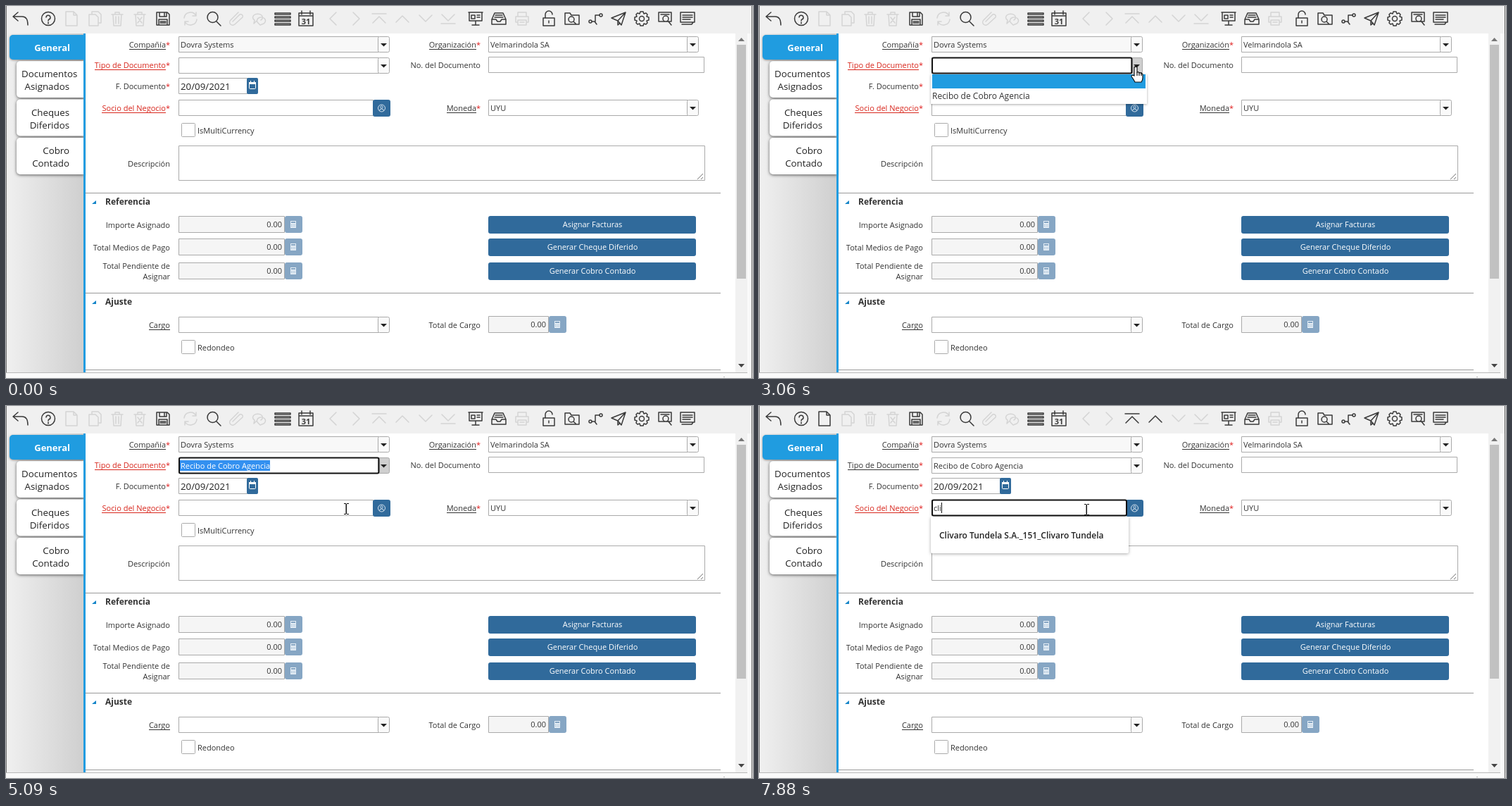
Recreate the animation shown at these times as an HTML page with a canvas. Size 1061x528 px, loop 8 s.

```html
<!DOCTYPE html>
<html lang="es">
<head>
<meta charset="utf-8">
<style>
html, body { margin: 0; width: 100%; height: 100%; overflow: hidden; background: #fff; }
canvas { display: block; }
</style>
</head>
<body>
<canvas id="stage" width="1061" height="528"></canvas>
<script>
const g = document.getElementById('stage').getContext('2d');
const LOOP = 8000;
const BLUE = '#209ce0', STEEL = '#306a9b', PALE = '#86a6c4', EDGE = '#aaa', DARK = '#3a3a3a', DIM = '#d4d4d4';
const CLIENT = 'Clivaro Tundela S.A._151_Clivaro Tundela';

// Cursor stops: time, x, y, length of one step on the way to the next stop
const stops = [
  [590, 1042, 514, 80], [990, 495, 156, 80],
  [1250, 495, 156, 70], [1530, 534, 82, 70], [1600, 535, 86, 70],
  [3320, 535, 86, 70], [3880, 489, 127, 70],
  [4743, 489, 127, 67], [5079, 483, 146, 67], [5213, 474, 151, 67], [5480, 465, 147, 67]
];
const clicks = [[2430, 2560, 536, 90], [4150, 4350, 489, 129], [5760, 5890, 465, 147]];

// Toolbar icons, drawn around their own centre: x, path, disabled
const icons = [
  [21, 'M-4-9L-11-3L-4 3M-11-3H2Q10-3 10 9'],
  [60, 'M-9.500 0a9.500 9.500 0 1 0 19 0a9.500 9.500 0 1 0-19 0M-3-2a3 3 0 1 1 4 3q-1 .5-1 2M0 5v2'],
  [93, 'M-8-10H3L8-5V10H-8ZM3-10V-5H8', 1],
  [126, 'M-8-6H1L5-2V10H-8ZM-4-6V-10H5L9-6V6H5', 1],
  [158, 'M-8-6H8M-3-6V-9H3V-6M-6-6L-5 10H5L6-6M-2-3V7M2-3V7', 1],
  [190, 'M-8-6H8M-3-6V-9H3V-6M-6-6L-5 10H5L6-6M-3-2L3 6M3-2L-3 6', 1],
  [223, 'M-9-9H6L9-6V9H-9ZM-5-9V-3H5V-9M2-8V-4M-6 9V1H6V9M-4 4H4M-4 6H4'],
  [262, 'M-9-1A9 9 0 0 1 8-4M8-9V-4H3M9 1A9 9 0 0 1-8 4M-8 9V4H-3', 1],
  [295, 'M-9-2a7.500 7.500 0 1 0 15 0a7.500 7.500 0 1 0-15 0M4 4L10 10'],
  [328, 'M-6 4L4-6a3 3 0 0 1 4 4L-3 8a4 4 0 0 1-6-6L2-9', 1],
  [361, 'M-5 3L-9 7L-8 2A7 5 0 1 1 1 2M-4 5A6 5 0 1 1 5 7L0 9Z', 1],
  [393, 'M-11-8H11V-6H-11ZM-11-3H11V-1H-11ZM-11 2H11V4H-11ZM-11 7H11V9H-11Z'],
  [426, 'M-10-8H10V10H-10ZM-10-4H10M-6-11V-6M6-11V-6'],
  [465, 'M4-9L-5 0L4 9', 1],
  [497, 'M-4-9L5 0L-4 9', 1],
  [530, 'M-10-7H10M-9 6L0-3L9 6', 1],
  [563, 'M-9 5L0-4L9 5', 1],
  [596, 'M-9-5L0 4L9-5', 1],
  [628, 'M-9-6L0 3L9-6M-10 7H10', 1],
  [667, 'M-10-9H10M-9-9V3H9V-9M0 3V9M-5 9H5M-6-5H-1V0H-6ZM2-5H6M2-2H6'],
  [700, 'M-10 1L-6-8H6L10 1V8H-10ZM-10 1H-4L-2 4H2L4 1H10M-5-5H5M-6-2H6'],
  [733, 'M-6-3V-9H6V-3M-6 5H-9V-3H9V5H6M-6 2H6V9H-6ZM-3 5H3', 1],
  [771, 'M-8-1H8V10H-8ZM-5-1V-6A5 5 0 0 1 5-6M0 3V6'],
  [804, 'M-10 8V-8H-3L-1-5H10V8ZM-5 1a4 4 0 1 0 8 0a4 4 0 1 0-8 0M2 4L6 8'],
  [837, 'M-9 4a2 2 0 1 0 4 0a2 2 0 1 0-4 0M-5 4H0V-5H6M6-5a2 2 0 1 0 4 0a2 2 0 1 0-4 0M-1 4L2 8'],
  [870, 'M-10-1L10-9L4 9L-1 3ZM10-9L-1 3V9L2 6'],
  [903, 'M-3.500 0a3.500 3.500 0 1 0 7 0a3.500 3.500 0 1 0-7 0M-2-10H2L3-7L6-8L8-6L7-3L10-2V2L7 3L8 6L6 8L3 7L2 10H-2L-3 7L-6 8L-8 6L-7 3L-10 2V-2L-7-3L-8-6L-6-8L-3-7Z'],
  [936, 'M-9-9H9V4H-9ZM-6-6H6M-3 0a4 4 0 1 0 8 0a4 4 0 1 0-8 0M4 3L9 9'],
  [968, 'M-10-9H10V5H-10ZM-7-5H7M-7-2H7M-7 1H4M-8 8H6L8 5']
].map(([x, d, off]) => ({ x, path: new Path2D(d), off }));

const ARROW = new Path2D('M0 0V16L4 12.500L6.500 18L9 17L6.500 11.500H11.500Z');
const HAND = new Path2D('M-2 1Q0-1 2 1V8Q4 7 5 9Q7 8 8 10Q10 9 10 12V16Q10 19 8 22H-1Q-3 18-6 14Q-6 11-2 13Z');

function box(x, y, w, h, fill, stroke, r = 0, line = 1) {
  g.beginPath();
  g.roundRect(x + (stroke ? .5 : 0), y + (stroke ? .5 : 0), w, h, r);
  if (fill) { g.fillStyle = fill; g.fill(); }
  if (stroke) { g.strokeStyle = stroke; g.lineWidth = line; g.stroke(); }
}
function text(s, x, y, color = '#333', align = 'left', size = 11, weight = 400) {
  g.font = `${weight} ${size}px "Open Sans", sans-serif`;
  g.textAlign = align;
  g.fillStyle = color;
  g.fillText(s, x, y);
}
function shadow(color, blur, draw) {
  g.save();
  g.shadowColor = color; g.shadowBlur = blur; g.shadowOffsetY = 1;
  draw();
  g.restore();
}
function label(s, right, y, { star, link, red } = {}) {
  const color = red ? '#d8261c' : '#333';
  if (star) { text('*', right, y, '#e02020', 'right'); right -= 6; }
  text(s, right, y, color, 'right');
  if (link) {
    const w = g.measureText(s).width;
    g.fillRect(Math.round(right - w), y + 2, Math.round(w), 1);
  }
}
function triangle(x1, y1, x2, y2, x3, y3, color) {
  g.fillStyle = color;
  g.beginPath(); g.moveTo(x1, y1); g.lineTo(x2, y2); g.lineTo(x3, y3); g.fill();
}
function combo(x, y, w, value, { focus, pressed, fill = '#fff' } = {}) {
  box(x, y, w - 16, 22, fill, EDGE);
  box(x + w - 17, y, 16, 22, pressed ? '#cfcfcf' : '#fafafa', EDGE, 2);
  triangle(x + w - 13, y + 10, x + w - 4, y + 10, x + w - 8.5, y + 14.5, '#222');
  if (focus) box(x + .5, y, w - 16.5, 22, null, '#111', 2, 2);
  text(value, x + 3, y + 16);
}
function amount(x, y, w) {
  box(x, y, w, 23, '#f5f5f5', EDGE);
  text('0.00', x + w - 3, y + 16, '#333', 'right');
  box(x + w + 1, y, 25, 24, PALE, null, 3);
  box(x + w + 9, y + 7, 8, 10, '#e4edf5');
  g.fillStyle = PALE;
  g.fillRect(x + w + 10, y + 8, 6, 2);
  for (let i = 0; i < 6; i++) g.fillRect(x + w + 10 + i % 3 * 2.3, y + 12 + (i / 3 | 0) * 2, 1, 1);
}
function button(y, s) {
  box(685, y, 295, 25, STEEL, null, 3);
  text(s, 833, y + 16, '#fff', 'center');
}
function section(y, s) {
  g.fillStyle = '#999';
  g.fillRect(113, y, 902, 1);
  triangle(128, y + 11, 128, y + 16, 122, y + 16, '#1585c8');
  text(s, 141, y + 17, '#333', 'left', 12, 700);
}
function check(y, s) {
  box(249, y, 19, 19, '#fff', EDGE, 1);
  text(s, 272, y + 15);
}

function toolbar(saved) {
  g.lineJoin = g.lineCap = 'round';
  for (const { x, path, off } of icons) {
    const on = !off || saved && [93, 530, 563].includes(x);
    g.save();
    g.translate(x, 18);
    g.strokeStyle = on ? DARK : DIM;
    g.lineWidth = 1.5;
    g.stroke(path);
    g.restore();
  }
  text('31', 426, 26, DARK, 'center', 11, 700);
  g.lineJoin = 'miter'; g.lineCap = 'butt';
}

function frame() {
  g.fillStyle = '#f0f0f0'; g.fillRect(0, 0, 1061, 528);
  const side = g.createLinearGradient(0, 0, 110, 0);
  side.addColorStop(0, '#f0f0f0'); side.addColorStop(1, '#cfcfcf');
  g.fillStyle = side; g.fillRect(0, 39, 110, 481);
  box(113, 39, 923, 481, '#fff');
  box(1036, 39, 17, 481, '#f1f1f1');
  box(1038, 55, 13, 332, '#c1c1c1');
  triangle(1040, 50, 1049, 50, 1044.5, 45, '#777');
  triangle(1040, 508, 1049, 508, 1044.5, 513, '#444');
  box(0, 521, 1061, 7, '#fafafa');
  box(0, 520, 1053, 1, '#b8b8b8');
  box(1053, 39, 6, 489, '#fafafa');
  box(0, 0, 1, 520, '#777');
  box(1059, 0, 1, 528, '#555');
  box(1019, 526, 2, 1, '#bbb');

  [['Documentos', 'Asignados'], ['Cheques', 'Diferidos'], ['Cobro', 'Contado']].forEach(([a, b], i) => {
    const y = 78 + i * 54.5;
    shadow('#0009', 4, () => box(15, y, 96, 52, '#fff', null, [5, 0, 0, 5]));
    if (i) text(a, 90, y + 23, '#222', 'right', 13.3);
    else text(a, 22, y + 23, '#222', 'left', 13.3);
    text(b, 90, y + 41, '#222', 'right', 13.3);
  });
  shadow('#0006', 3, () => box(5, 41, 106, 35, BLUE, null, [5, 0, 0, 5]));
  text('General', 91, 64, '#fff', 'right', 13, 700);
  box(110, 39, 3, 481, BLUE);
}

function form(t, hover) {
  const combofocus = t >= 2920 && t < 5760, chosen = t >= 4280, saved = t >= 5410, searching = t >= 5760;

  label('Compañía', 233, 59, { star: 1, link: 1 });
  combo(245, 43, 300, 'Dovra Systems', { fill: '#f8f8f8' });
  label('Organización', 674, 59, { star: 1, link: 1 });
  combo(685, 43, 299, 'Velmarindola SA');

  label('Tipo de Documento', 233, 88, { star: 1, link: 1, red: !saved });
  const picked = 'Recibo de Cobro Agencia';
  combo(245, 73, 300, chosen ? picked : '', { focus: combofocus, pressed: combofocus || hover });
  if (chosen && combofocus) {
    box(247, 77, 128, 15, '#3390f0');
    text(picked, 248, 89, '#fff');
  }
  label('No. del Documento', 674, 88);
  box(685, 72, 306, 22, '#fff', EDGE);

  label('F. Documento', 233, 118, { star: 1 });
  box(245, 102, 97, 22, '#fff', EDGE);
  text('20/09/2021', 248, 119, '#222', 'left', 13.3);
  box(342, 102, 16, 23, STEEL, null, 2);
  box(345, 108, 9, 9, null, '#fff', 1);
  box(345, 108, 10, 3, '#fff');
  box(347, 106, 1, 3, '#fff'); box(352, 106, 1, 3, '#fff');

  label('Socio del Negocio', 233, 149, { star: 1, link: 1, red: 1 });
  box(245, 133, 276, 22, '#fff', EDGE);
  box(521, 133, 25, 24, STEEL, null, 3);
  g.strokeStyle = '#d5e3ef'; g.lineWidth = 1;
  g.beginPath(); g.arc(533.5, 145, 5, 0, 7); g.stroke();
  g.beginPath(); g.arc(533.5, 143.5, 1.7, 0, 7); g.stroke();
  g.beginPath(); g.arc(533.5, 149, 3, Math.PI, 0); g.stroke();
  label('Moneda', 674, 149, { star: 1, link: 1 });
  combo(685, 133, 299, 'UYU');

  check(166, 'IsMultiCurrency');
  label('Descripción', 233, 228);
  box(245, 198, 747, 49, '#fff', EDGE);
  g.strokeStyle = '#777'; g.lineWidth = 1;
  g.beginPath();
  g.moveTo(982, 246); g.lineTo(990, 238); g.moveTo(987, 246); g.lineTo(990, 243);
  g.stroke();

  section(265, 'Referencia');
  label('Importe Asignado', 233, 315);
  label('Total Medios de Pago', 233, 347);
  label('Total Pendiente de', 233, 373);
  label('Asignar', 233, 388);
  amount(245, 298, 150); amount(245, 330, 150); amount(245, 364, 150);
  button(298, 'Asignar Facturas');
  button(330, 'Generar Cheque Diferido');
  button(364, 'Generar Cobro Contado');

  section(407, 'Ajuste');
  label('Cargo', 233, 457, { link: 1 });
  combo(245, 441, 300, '');
  label('Total de Cargo', 674, 457);
  amount(685, 440, 85);
  check(474, 'Redondeo');
  box(113, 516, 902, 1, '#999');

  if (searching) {
    box(245.5, 133, 276, 22, null, '#111', 2, 2);
    const typed = 'cli'.slice(0, t < 7480 ? 0 : t < 7680 ? 1 : t < 7880 ? 2 : 3);
    text(typed, 248, 149);
    const caretOn = t < 6350 || t >= 6880 && t < 7410 || t >= 7480;
    if (caretOn) box(248 + Math.round(g.measureText(typed).width), 137, 1, 15, '#111');
  }
  if (t >= 5890) {
    shadow('#0005', 4, () => box(244, 157, 281, 52, '#fff', null, 2));
    text(CLIENT, 256, 188, '#222', 'left', 12, 600);
  }
}

function list(t) {
  g.globalAlpha = Math.min(1, (Math.floor((t - 2920) / 70) + 1) / 3);
  shadow('#0005', 3, () => box(244, 97, 307, 42, '#fff'));
  const second = t >= 3810;
  box(246, second ? 118 : 97, 303, 20, BLUE);
  text('Recibo de Cobro Agencia', 246, 132, second ? '#fff' : '#333', 'left', 12);
  g.globalAlpha = 1;
}

function tooltip(t) {
  g.globalAlpha = t < 1810 ? .5 : 1;
  box(541, 112, 158, 19, '#fff', '#888');
  text('Tipo de documento o reglas', 547, 126, '#555');
  g.globalAlpha = 1;
}

function cursorAt(t) {
  let i = stops.length - 1;
  while (i > 0 && stops[i][0] > t) i--;
  const [t0, x0, y0, step] = stops[i];
  const [t1, x1, y1] = stops[i + 1] || [t0 + 1, x0, y0];
  const k = Math.floor((t - t0) / step) * step / (t1 - t0);
  return [x0 + (x1 - x0) * k, y0 + (y1 - y0) * k];
}

function drawCursor(x, y, open) {
  const within = (a, b, c, d) => x >= a && x <= c && y >= b && y <= d;
  const onButton = within(529, 73, 545, 96);
  const onText = within(245, 198, 992, 248) || within(245, 134, 521, 157) || within(245, 73, 528, 95);
  g.save();
  g.translate(Math.round(x), Math.round(y));
  if (onText && !open) {
    g.fillStyle = '#111';
    g.fillRect(-.5, -7, 1.5, 14);
    for (const row of [-8, 7]) { g.fillRect(-3, row, 3, 1); g.fillRect(1, row, 3, 1); }
  } else {
    const shape = onButton || open ? HAND : ARROW;
    g.fillStyle = '#fff'; g.strokeStyle = '#111'; g.lineWidth = 1.2;
    g.fill(shape); g.stroke(shape);
    if (shape === HAND) {
      g.beginPath();
      for (const fx of [2, 5, 8]) { g.moveTo(fx, 8); g.lineTo(fx, 13); }
      g.stroke();
    }
  }
  g.restore();
}

function draw(now) {
  const t = now % LOOP;
  const [x, y] = cursorAt(t);
  const open = t >= 2920 && t < 4280;
  frame();
  toolbar(t >= 5410);
  form(t, t >= 1530 && t < 2920);
  if (open) list(t);
  if (t >= 1740 && t < 2360) tooltip(t);
  for (const [from, to, cx, cy] of clicks) {
    if (t < from || t >= to) continue;
    g.fillStyle = 'rgba(243,229,30,.75)';
    g.beginPath(); g.arc(cx, cy, 10, 0, 7); g.fill();
  }
  if (t >= 590) drawCursor(x, y, open);
  requestAnimationFrame(draw);
}
requestAnimationFrame(draw);
</script>
</body>
</html>
```
